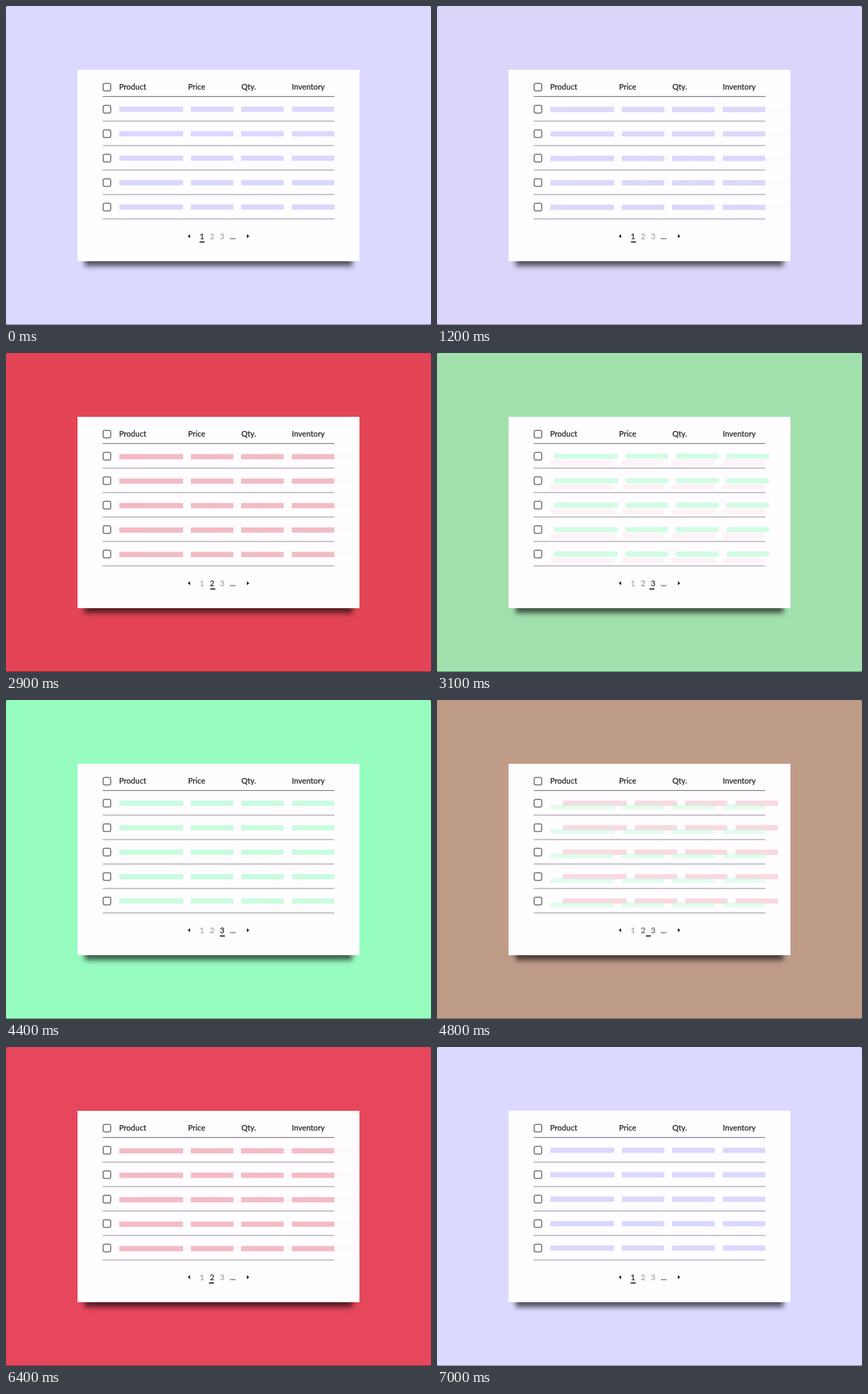
Recreate the animation shown at these times as an HTML page. Size 600 by 450 pixels, loop 7200 ms.

```html
<!DOCTYPE html>
<html lang="en">
<head>
<meta charset="utf-8">
<title>Paginated table</title>
<style>
  html, body { margin: 0; width: 100%; height: 100%; overflow: hidden; background: #333; }
  #stage { position: relative; width: 600px; height: 450px; overflow: hidden; border-radius: 2px; }
  #stage::after { content: ""; position: absolute; left: 0; right: 0; bottom: 0; height: 1px; background: rgba(0, 0, 0, .4); }
  #card { position: absolute; left: 101px; top: 89.5px; width: 397.5px; height: 270px; background: #fffdff;
          box-shadow: 0 17px 7px -10px rgba(0, 0, 0, .62); }
  svg { position: absolute; left: 0; top: 0; }
  text { font: 500 11px Lato, "Open Sans", sans-serif; fill: #2c2733; stroke: #2c2733; stroke-width: .2px; }
  #digits text { text-anchor: middle; }
</style>
</head>
<body>
<div id="stage">
  <div id="card"></div>
  <svg width="600" height="450" viewBox="0 0 600 450">
    <g id="bars"></g>
    <g id="grid" fill="none"></g>
    <text x="159.7" y="118">Product</text>
    <text x="257" y="118">Price</text>
    <text x="332.3" y="118">Qty.</text>
    <text x="403.5" y="118">Inventory</text>
    <g id="digits"></g>
    <text x="316.3" y="328.5">...</text>
    <path d="M260 322v5.4l-3.6-2.7zM340 322v5.4l3.6-2.7z" fill="#2c2733"/>
    <rect id="underline" y="332" width="7" height="1.7" fill="#2c2733"/>
  </svg>
</div>
<script>
const LOOP = 7200, STEP = 100, DURATION = 800;
const SLIDE_IN = 36, DROP_OUT = 10.5;
const PAGES = [
  { back: [219, 217, 255], bar: "#dad8fd" },
  { back: [231, 59, 80], bar: "#f4b6c1" },
  { back: [150, 253, 191], bar: "#c9fcdf" }
];
const CHANGES = [
  { at: 970, from: 0, to: 1 },
  { at: 2630, from: 1, to: 2 },
  { at: 4400, from: 2, to: 1 },
  { at: 6110, from: 1, to: 0 }
];
const COLUMNS = [[160, 90], [261, 60], [332, 60], [403.5, 60]];
const ROWS = 5, ROW_HEIGHT = 34.5;
const DARK = [44, 39, 51], PALE = [172, 168, 178];

const byId = id => document.getElementById(id);
const stage = byId("stage"), underline = byId("underline");

function add(parent, tag, attributes) {
  const node = document.createElementNS("http://www.w3.org/2000/svg", tag);
  for (const name in attributes) node.setAttribute(name, attributes[name]);
  return parent.appendChild(node);
}

function addCheckbox(y) {
  add(byId("grid"), "rect", { x: 137.2, y: y - 5.3, width: 10.6, height: 10.6, rx: 2.2, stroke: "#79737f", "stroke-width": 1.5 });
}

function addLine(y, color) {
  add(byId("grid"), "path", { d: `M136.5 ${y}H463.5`, stroke: color, "stroke-width": 1.1 });
}

addCheckbox(114.5);
addLine(127.6, "#85808c");
for (let row = 0; row < ROWS; row++) {
  addCheckbox(145.6 + row * ROW_HEIGHT);
  addLine(162.4 + row * ROW_HEIGHT, "#aaa6b0");
}

const barGroups = PAGES.map(page => {
  const group = add(byId("bars"), "g", { fill: page.bar });
  for (let row = 0; row < ROWS; row++)
    for (const [x, width] of COLUMNS)
      add(group, "rect", { x, y: 142 + row * ROW_HEIGHT, width, height: 7.4 });
  return group;
});

const digits = PAGES.map((page, i) => {
  const digit = add(byId("digits"), "text", { x: 276.8 + i * 14.2, y: 328.5 });
  digit.textContent = i + 1;
  return digit;
});

const mix = (a, b, p) => a + (b - a) * p;
const mixColor = (a, b, p) => `rgb(${a.map((v, i) => Math.round(mix(v, b[i], p)))})`;

function easeInOutExpo(x) {
  if (x <= 0) return 0;
  if (x >= 1) return 1;
  return x < .5 ? 2 ** (20 * x - 11) : 1 - 2 ** (9 - 20 * x);
}

function placeBars(index, opacity, x, y) {
  barGroups[index].setAttribute("opacity", opacity);
  barGroups[index].setAttribute("transform", `translate(${x} ${y})`);
}

function draw(time) {
  const change = CHANGES.filter(c => c.at <= time).pop() || CHANGES[CHANGES.length - 1];
  const p = time < change.at ? 1 : easeInOutExpo((time - change.at) / DURATION);
  const { from, to } = change;

  stage.style.backgroundColor = mixColor(PAGES[from].back, PAGES[to].back, p);
  PAGES.forEach((page, i) => {
    const focus = i === to ? p : i === from ? 1 - p : 0;
    const color = mixColor(PALE, DARK, focus);
    digits[i].style.fill = digits[i].style.stroke = color;
    placeBars(i, focus, i === to ? SLIDE_IN * (1 - p) : 0, i === from ? DROP_OUT * p : 0);
  });
  underline.setAttribute("x", 273.4 + 14.3 * mix(from, to, p));
}

function tick() {
  const time = performance.now() % LOOP;
  draw(Math.floor(time / STEP) * STEP);
  requestAnimationFrame(tick);
}
tick();
</script>
</body>
</html>
```
